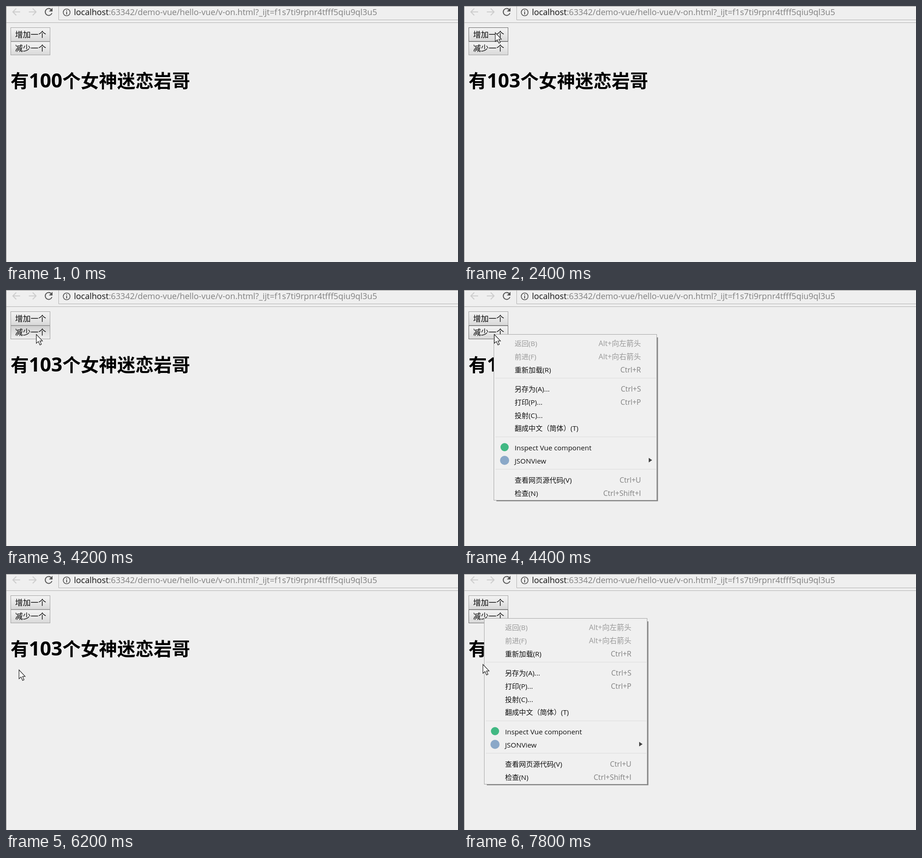
These frames come from a looping animation (991 by 562 pixels, 8 s). An HTML page:

```html
<!DOCTYPE html>
<html lang="zh-CN">
<head>
<meta charset="utf-8">
<style>
  html, body { margin: 0; width: 100%; height: 100%; overflow: hidden; background: #efefef; }
  svg { display: block; font-family: "Open Sans", "Noto Sans CJK SC", "Noto Sans CJK", sans-serif; }
  text { white-space: pre; }
  .button rect { fill: url(#raised); stroke: #a0a0a0; }
  .button.hover rect { stroke: #666; }
  .button.pressed rect { fill: url(#sunken); stroke: #999; }
  .button text { font-size: 17px; }
  .line { fill: none; stroke-width: 2; }
</style>
</head>
<body>
<svg width="991" height="562" viewBox="0 0 991 562">
  <defs>
    <linearGradient id="raised" x2="0" y2="1">
      <stop stop-color="#f3f3f3"/><stop offset=".45" stop-color="#e9e9e9"/><stop offset="1" stop-color="#d8d8d8"/>
    </linearGradient>
    <linearGradient id="sunken" x2="0" y2="1">
      <stop stop-color="#cfcfcf"/><stop offset=".5" stop-color="#e0e0e0"/><stop offset="1" stop-color="#efefef"/>
    </linearGradient>
  </defs>
  <rect width="991" height="562" fill="#efefef"/>

  <!-- browser bar -->
  <path d="M0 .5H991M.5 0V562" stroke="#8c8c8c"/>
  <path d="M115.5 1V30.5H991M1 36.5H991" fill="none" stroke="#b0b0b0"/>
  <path class="line" stroke="#cdcdcd" d="M31 13H16M22.5 5.5L15 13L22.5 20.5M50 13H65M58.5 5.5L66 13L58.5 20.5"/>
  <path class="line" stroke="#555" d="M99.5 8.5A7.5 7.5 0 1 0 100.7 15.5"/>
  <path d="M102 4V12H94Z" fill="#555"/>
  <circle class="line" cx="133" cy="14" r="7.5" stroke="#555" style="stroke-width:1.7"/>
  <path d="M133 9.2V11.2M133 12.8V18.5" stroke="#555" stroke-width="2"/>
  <text x="149" y="20" font-size="18.2" fill="#808080"><tspan fill="#111">localhost</tspan>:63342/demo-vue/hello-vue/v-on.html?_ijt=f1s7ti9rpnr4tfff5qiu9ql3u5</text>

  <!-- page -->
  <g class="button"><rect x="10.5" y="47.5" width="86" height="30"/><text x="20" y="69">增加一个</text></g>
  <g class="button"><rect x="10.5" y="78.5" width="86" height="29"/><text x="20" y="99">减少一个</text></g>
  <text x="10" y="178.5" font-size="40" font-weight="700">有<tspan id="count" font-size="43">100</tspan>个女神迷恋岩哥</text>

  <g id="menu">
    <path d="M359 104V462.5H6" fill="none" stroke="#b4b4b4" stroke-width="3"/>
    <path d="M359 104V462.5H6" fill="none" stroke="#777" stroke-width="1.5"/>
    <g id="menuBody">
      <rect x=".5" y="97.5" width="357" height="364" fill="#f0f0f0" stroke="#a6a6a6"/>
      <path d="M4 193.5H356M4 322.5H356M4 393.5H356" stroke="#dcdcdc"/>
      <circle cx="24" cy="345" r="9" fill="#41b883"/>
      <circle cx="24" cy="374" r="10" fill="#8aa8c8"/>
      <path d="M340 368.5L347.5 373.5L340 378.5Z" fill="#444"/>
    </g>
  </g>
  <path id="cursor" d="M.5 .5V20L5 16L8.4 23.6L11.6 22.2L8.3 14.8H14Z" fill="#fff" stroke="#222" stroke-width="1.2"/>
</svg>
<script>
const $ = id => document.getElementById(id);
const buttons = document.querySelectorAll('.button');
const DURATION = 8000;

// centre line, label, shortcut, disabled
const items = [
  [117, '返回(B)', 'Alt+向左箭头', true],
  [146, '前进(F)', 'Alt+向右箭头', true],
  [175, '重新加载(R)', 'Ctrl+R'],
  [217, '另存为(A)...', 'Ctrl+S'],
  [246, '打印(P)...', 'Ctrl+P'],
  [275, '投射(C)...'],
  [303, '翻成中文（简体）(T)'],
  [346, 'Inspect Vue component'],
  [375, 'JSONView'],
  [417, '查看网页源代码(V)', 'Ctrl+U'],
  [446, '检查(N)', 'Ctrl+Shift+I'],
];

function addText(content, x, y, size, fill, anchor) {
  const node = document.createElementNS($('menu').namespaceURI, 'text');
  const attributes = { x, y, fill, 'font-size': size, 'text-anchor': anchor };
  for (const name in attributes) node.setAttribute(name, attributes[name]);
  node.textContent = content;
  $('menuBody').append(node);
}

for (const [y, label, shortcut, disabled] of items) {
  addText(label, 46, y + 5.5, 15.3, disabled ? '#999' : '#111', 'start');
  if (shortcut) addText(shortcut, 323, y + 5.5, 16, disabled ? '#999' : '#808080', 'end');
}

// Each step overrides part of the state before it.
const steps = [
  { at: 0, x: 60, y: -40, add: '', sub: '', count: 100, menu: '', menuX: 65 },
  { at: 200, x: 62, y: -8 },
  { at: 400, x: 70, y: 28 },
  { at: 600, x: 71, y: 61, add: 'hover' },
  { at: 800, x: 69, y: 59 },
  { at: 1000, x: 68, y: 58 },
  { at: 1200, add: 'pressed' },
  { at: 1400, add: 'hover', count: 101 },
  { at: 1800, add: 'pressed' },
  { at: 2000, add: 'hover', count: 102 },
  { at: 2200, add: 'pressed' },
  { at: 2400, add: 'hover', count: 103 },
  { at: 3400, x: 68, y: 105, add: '', sub: 'hover' },
  { at: 3600, x: 67, y: 97 },
  { at: 4000, x: 66, sub: 'pressed' },
  { at: 4400, sub: 'hover', menu: 'open' },
  { at: 5200, x: 58, y: 118 },
  { at: 5400, x: 44, y: 160 },
  { at: 5600, x: 32, y: 200 },
  { at: 5800, x: 27, y: 212 },
  { at: 6000, x: 28, y: 210 },
  { at: 6200, sub: '', menu: '' },
  { at: 6400, x: 40, y: 130 },
  { at: 6600, x: 44, y: 97, sub: 'pressed' },
  { at: 6800, sub: 'hover', count: 102 },
  { at: 7000, sub: 'pressed', menu: 'shadow', menuX: 44 },
  { at: 7200, sub: 'hover', menu: 'open' },
  { at: 7400, x: 50, y: 120 },
  { at: 7600, x: 58, y: 319 },
  { at: 7800, x: 41, y: 198 },
];

function draw(now) {
  const time = now % DURATION;
  const state = Object.assign({}, ...steps.filter(step => step.at <= time));
  buttons[0].setAttribute('class', 'button ' + state.add);
  buttons[1].setAttribute('class', 'button ' + state.sub);
  $('count').textContent = state.count;
  $('menu').setAttribute('transform', `translate(${state.menuX})`);
  $('menu').style.display = state.menu ? '' : 'none';
  $('menuBody').style.display = state.menu === 'open' ? '' : 'none';
  $('cursor').setAttribute('transform', `translate(${state.x} ${state.y})`);
}

const start = performance.now();
function tick() {
  draw(performance.now() - start);
  requestAnimationFrame(tick);
}
tick();
</script>
</body>
</html>
```
